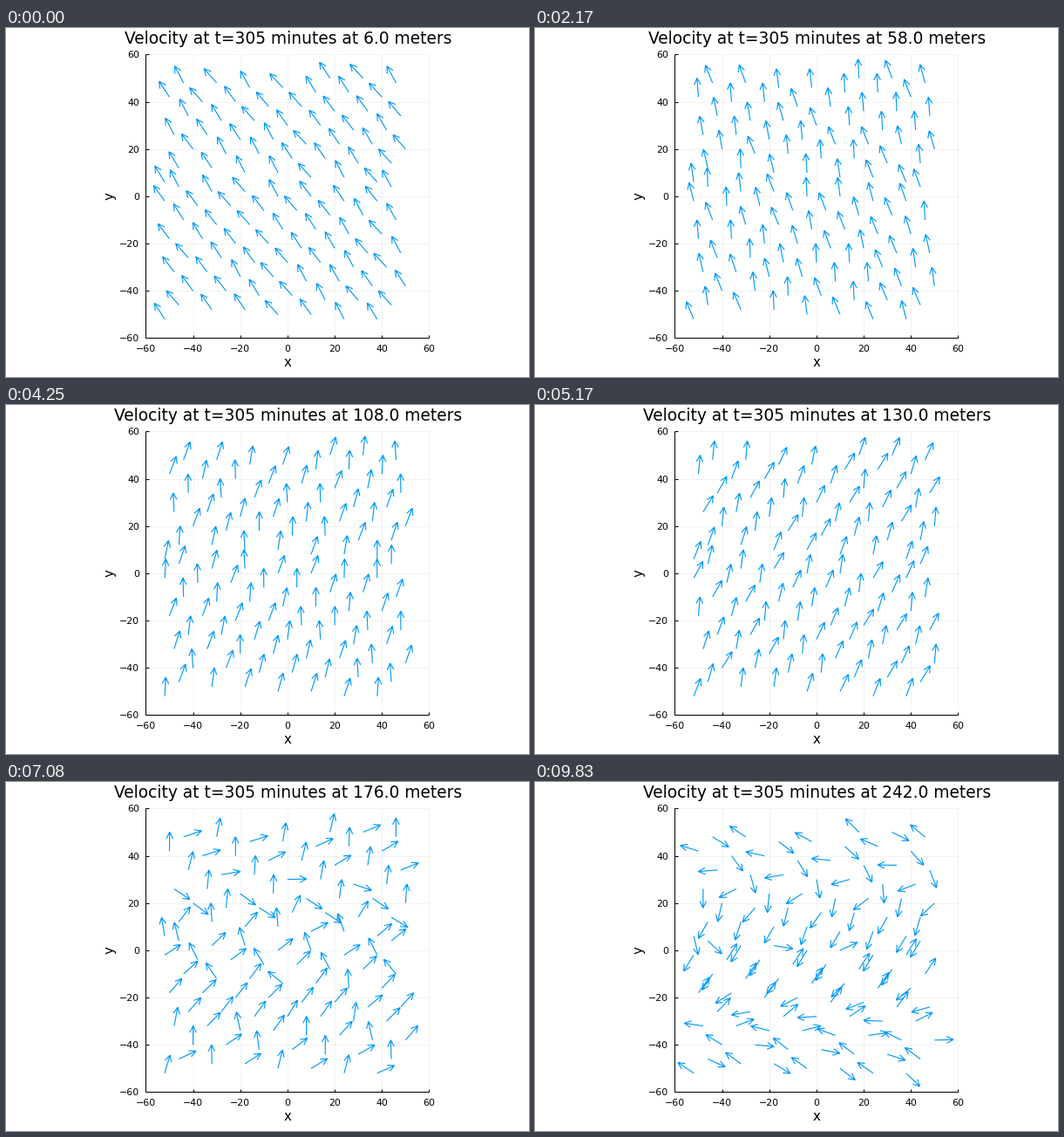
These frames come from a looping animation (600x400 px, 9910 ms). A matplotlib script:

```python
import numpy as np
import matplotlib.pyplot as plt
from matplotlib.animation import FuncAnimation

W, H, DPI = 600, 400, 100
LOOP_MS = 9910
FRAMES = 119
CX, CY, SCALE = 322.9, 192.9, 325 / 120
BLUE = "#009AFA"
ARROW, HEAD, BARB = 8 * SCALE, 7.6, 3.8

plt.rcParams["font.family"] = "DejaVu Sans"


def pt(px):
    return px * 72 / DPI


def to_px(x, y):
    return CX + np.asarray(x) * SCALE, CY - np.asarray(y) * SCALE


# Every 25th cell of a 52 x 52 grid, walking left by 7 columns each time
n = np.arange(109)
start = np.where(n < 61, 0, 61)
col = -7 * (n - start) % 52
row = 25 * n // 52
tail_x, tail_y = to_px(2 * col - 52, 2 * row - 52)


def unit(degrees):
    return np.exp(1j * np.radians(degrees))


def curve(*points):
    return np.interp(n, *zip(*points))


def strands(even, odd):
    """Two smooth flows that alternate from one arrow to the next."""
    return unit(np.where(n % 2 == 0, even, odd))


SHEAR_FROM, SHEAR_Z, TOP_Z = 135, 200, 242
shear = strands(
    curve((0, 70), (8, 112), (20, 112), (28, 46), (64, 12), (74, 88),
          (108, 92)),
    curve((0, -5), (20, 41), (37, 28), (41, 166), (67, 113), (69, -65),
          (81, -76), (93, 0)),
)
eddy = strands(
    curve((0, 146), (12, 142), (44, 237), (70, 240), (108, 135)),
    curve((0, -47), (31, 53), (53, 58), (63, -110), (79, -101), (108, -24)),
)

rng = np.random.default_rng(5)
phase = rng.uniform(0, 2 * np.pi, n.size)
wave = rng.uniform(30, 70, n.size)


def mix(a, b, t):
    return (1 - t) * a + t * b


def flow_at(z):
    """Wind direction: a steady veer, then shear, then an eddy on top."""
    d = unit(max(125 - 0.43 * (z - 6), 70))
    d = mix(d, shear, np.clip((z - SHEAR_FROM) / (SHEAR_Z - SHEAR_FROM), 0, 1))
    d = mix(d, eddy, np.clip((z - SHEAR_Z) / (TOP_Z - SHEAR_Z), 0, 1))
    sway = np.interp(z, [6, SHEAR_FROM, SHEAR_Z, TOP_Z], [8, 14, 3, 0])
    d = d * unit(sway * np.sin(2 * np.pi * z / wave + phase))
    return d / np.abs(d)


def arrow_path(d):
    """One broken polyline holding every shaft and open head."""
    tail = tail_x + 1j * tail_y
    u = np.conj(d)  # screen y points down
    tip = tail + ARROW * u
    left = tip + (-HEAD + 1j * BARB) * u
    right = tip + (-HEAD - 1j * BARB) * u
    gap = np.full(n.size, np.nan + 1j * np.nan)
    p = np.stack([tail, tip, gap, left, tip, right, gap], axis=1).ravel()
    return p.real, p.imag


fig = plt.figure(figsize=(W / DPI, H / DPI), dpi=DPI, facecolor="white")
ax = fig.add_axes([0, 0, 1, 1])
ax.set_xlim(0, W)
ax.set_ylim(H, 0)
ax.axis("off")


def line(x, y, width=1.0, **kw):
    return ax.plot(x, y, lw=pt(width), solid_capstyle="butt", **kw)[0]


def label(x, y, s, size, ha="center", va="baseline", **kw):
    return ax.text(x, y, s, fontsize=pt(size), ha=ha, va=va,
                   color="black", **kw)


left, bottom = to_px(-60, -60)
right, top = to_px(60, 60)
for v in range(-60, 61, 20):
    x, y = to_px(v, v)
    line([x, x], [bottom, top], 0.7, color="black", alpha=0.07)
    line([left, right], [y, y], 0.7, color="black", alpha=0.07)
    line([x, x], [bottom, bottom - 3.5], color="black")
    line([left, left + 3.5], [y, y], color="black")
    text = str(v).replace("-", "\u2212")
    label(x, 370.6, text, 11)
    label(153, y + 4, text, 11, ha="right")
line([left, right], [bottom, bottom], color="black")
line([left, left], [bottom, top], color="black")

label(CX, 388.3, "x", 15)
label(126.8, CY, "y", 15, ha="right", va="center", rotation=90)
title = label(CX + 0.5, 17.6, "", 18.67)
arrows = line([], [], 1.15, color=BLUE, solid_joinstyle="miter")


def update(i):
    z = 6 + 2 * i
    title.set_text(f"Velocity at t=305 minutes at {z:.1f} meters")
    arrows.set_data(*arrow_path(flow_at(z)))
    return title, arrows


anim = FuncAnimation(fig, update, frames=FRAMES, interval=LOOP_MS / FRAMES,
                     repeat=True, repeat_delay=0)
plt.show()
```
